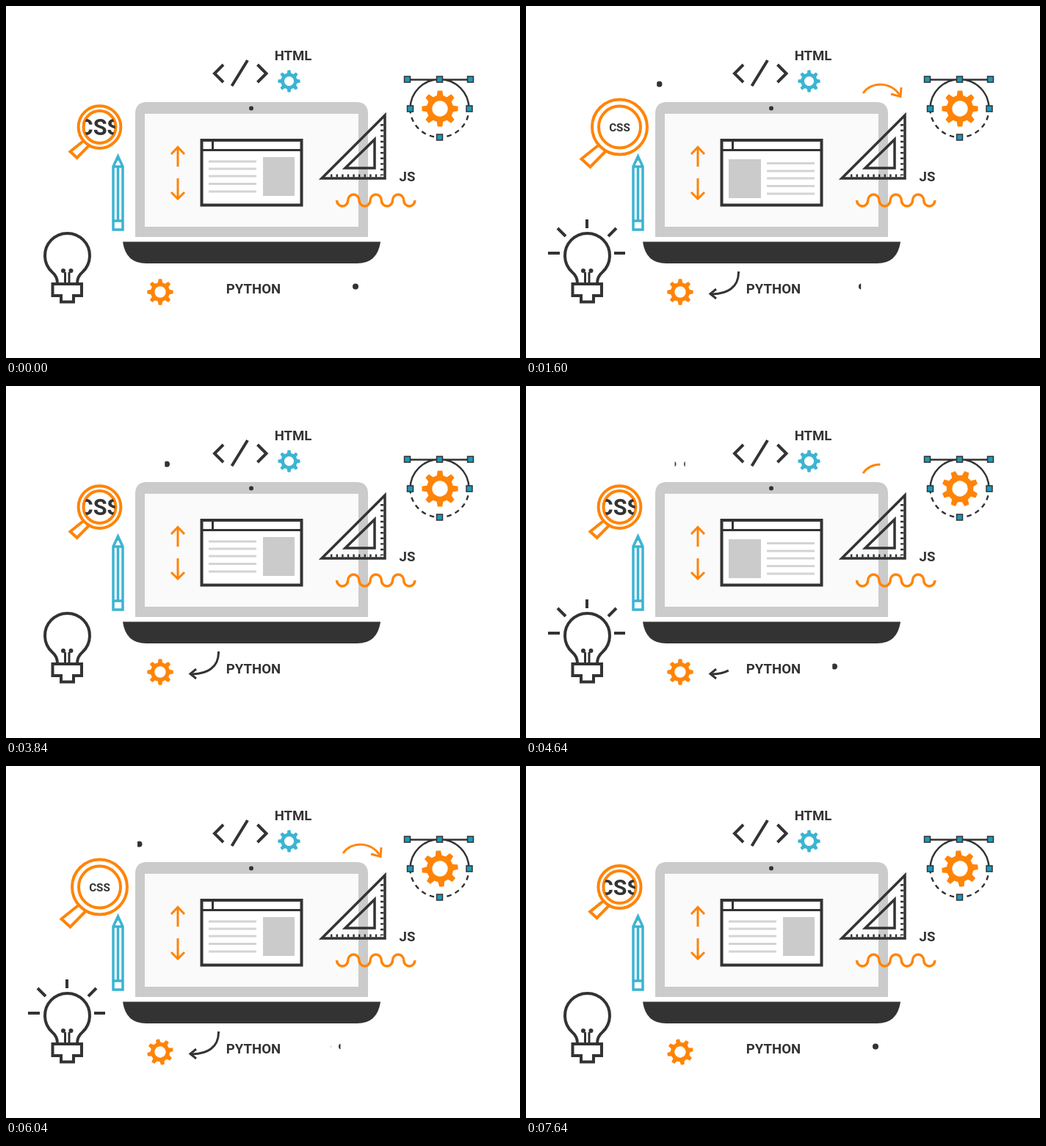
These frames come from a looping animation (700x480 px, 7680 ms). An HTML page:

```html
<!DOCTYPE html>
<html lang="en">
<head>
<meta charset="utf-8">
<title>Web development</title>
<style>
  html, body { margin: 0; width: 100%; height: 100%; overflow: hidden; background: #fff; }
  svg { display: block; width: 700px; height: 480px; --dark: #333; --orange: #ff8408; --cyan: #3cb4d2; }
  text { font: 700 18.6px Roboto, "Open Sans", sans-serif; fill: var(--dark); text-anchor: middle; }
  .line { fill: none; stroke: var(--dark); stroke-width: 4; }
  .orange { stroke: var(--orange); }
  .cyan { stroke: var(--cyan); }
  .thin { stroke-width: 3; }
  #lens * { vector-effect: non-scaling-stroke; }
</style>
</head>
<body>
<svg viewBox="0 0 700 480">
  <defs>
    <path id="gear" fill-rule="evenodd"/>
    <clipPath id="glass"><circle id="glassEdge" cx="127.500" cy="165"/></clipPath>
    <clipPath id="topWindow"><rect id="topRect" y="96" width="14" height="20"/></clipPath>
    <clipPath id="lowWindow"><rect id="lowRect" y="372" width="13" height="20"/></clipPath>
  </defs>

  <!-- laptop -->
  <path d="M176 315V147Q176 131 192 131H477Q493 131 493 147V315Z" fill="#cbcbcb"/>
  <path d="M189 147H480V301H189Z" fill="#fafafa"/>
  <circle cx="334" cy="139.5" r="3" fill="#2b3436"/>
  <path d="M159 321.5H510Q506 351 478 351H191Q163 351 159 321.5Z" fill="#333"/>

  <!-- browser window -->
  <path class="line" d="M266.500 183H402.500V271.500H266.500Z" style="fill:#fff"/>
  <path class="line thin" d="M267 196.500H402M281.500 183V196"/>
  <g id="pageRight">
    <path d="M350 206H393V259H350Z" fill="#cbcbcb"/>
    <path class="line thin" style="stroke:#d4d4d4" d="M276 212H341M276 222H341M276 232H341M276 242.500H341M276 253H341"/>
  </g>
  <g id="pageLeft">
    <path d="M276 209H320V262H276Z" fill="#cbcbcb"/>
    <path class="line thin" style="stroke:#d4d4d4" d="M328 214.500H393M328 225H393M328 235H393M328 245.500H393M328 256H393"/>
  </g>
  <path class="line orange thin" d="M234 219V193M225 202L234 192.500L243 202M234 235V262M225 254L234 263L243 254"/>

  <!-- code and words -->
  <path class="line" d="M296 80L284 92L296 104M329 74L307.500 109M342.500 80L354.500 92L342.500 104"/>
  <text x="391" y="73.500">HTML</text>
  <text x="546.500" y="239">JS</text>
  <text x="337" y="391.500">PYTHON</text>

  <!-- magnifier -->
  <g id="lens" class="line orange">
    <circle r="37.5"/><circle r="28.5"/>
    <path d="M-29 25L-52 43.500L-40 54.500L-19 33"/>
  </g>
  <g clip-path="url(#glass)"><text id="css">CSS</text></g>

  <!-- pencil -->
  <path class="line cyan" style="stroke-width:3.5" d="M146 219L152.500 205L159 219V305H146ZM146 219H159M152.500 219V293M146 293H159"/>
  <path d="M149 211L152.500 203L156 211Z" fill="#3cb4d2"/>

  <!-- bulb -->
  <path class="line" d="M70 378Q70 369 63 363A30.500 30.500 0 1 1 104 363Q97 369 97 378M63.500 379H103V395H92V403.500H75V395H63.500Z"/>
  <path class="line thin" d="M80.500 378V363M86 378V363"/>
  <circle cx="78" cy="361" r="3" fill="#333"/>
  <circle cx="88.500" cy="361" r="3" fill="#333"/>
  <path id="rays" class="line"/>

  <!-- set square -->
  <path class="line" d="M516 149V235H430ZM502 182V221H462Z" style="stroke-width:3.5"/>
  <path class="line" d="M512 161V231M442 231.500H511" stroke-dasharray="2.4 5.200"/>
  <path id="wave" class="line orange" style="stroke-width:3.5"/>

  <!-- curve tool -->
  <path class="line" style="stroke-width:2.4" d="M546 100.500H632M550.500 140A40 40 0 0 1 630.500 140"/>
  <path class="line" style="stroke-width:2.4" stroke-dasharray="6.5 5.5" d="M550.500 140A40 39 0 0 0 630.500 140"/>
  <g id="nodes" fill="#1c98b8" stroke="#333" stroke-width="1.5"></g>

  <!-- gears -->
  <use href="#gear" fill="#3cb4d2" transform="translate(385.5 102.5) scale(15.2)"/>
  <use href="#gear" id="lowGear" fill="#ff8408"/>
  <use href="#gear" id="bigGear" fill="#ff8408"/>

  <!-- arrows -->
  <g class="line orange thin">
    <path id="topArrow" pathLength="1" d="M459 119C470 103 497 102 510 123"/>
    <path id="topHead" d="M497 120L510 123.500L511 111"/>
  </g>
  <g class="line thin">
    <path id="lowArrow" pathLength="1" d="M289.500 362C290 384 274 393 251 393"/>
    <path id="lowHead" d="M259 386L251 392.500L259 399"/>
  </g>

  <!-- dotted trails -->
  <g id="topDots" clip-path="url(#topWindow)" fill="#333"></g>
  <g id="lowDots" clip-path="url(#lowWindow)" fill="#333"></g>
</svg>
<script>
const $ = id => document.getElementById(id);
const set = (id, attrs) => {
  for (const k in attrs) $(id).setAttribute(k, attrs[k]);
};
const ramp = (t, a, b) => Math.min(1, Math.max(0, (t - a) / (b - a)));
const ease = x => x * x * (3 - 2 * x);
const show = (id, on) => $(id).style.visibility = on ? 'visible' : 'hidden';

// Eight tapered teeth around a ring of unit size, one pointing straight up
function gearPath() {
  const points = [];
  for (let i = 0; i < 8; i++) {
    for (const [da, r] of [[-.24, .74], [-.13, 1], [.13, 1], [.24, .74]]) {
      const a = i * Math.PI / 4 + da;
      points.push(`${Math.cos(a) * r} ${Math.sin(a) * r}`);
    }
  }
  return `M${points.join('L')}ZM.43 0A.43 .43 0 1 0 -.43 0A.43 .43 0 1 0 .43 0Z`;
}

function build() {
  set('gear', { d: gearPath() });
  let wave = 'M450.5 265';
  for (let i = 0; i < 7; i++) wave += `a7.6 8 0 0 ${i % 2} 15.2 0`;
  set('wave', { d: wave });
  const nodes = [[546.5, 100], [590.5, 100], [632.5, 100], [550.5, 140], [631, 140], [590.5, 179]];
  $('nodes').innerHTML = nodes.map(([x, y]) =>
    `<rect x="${x - 4}" y="${y - 4}" width="8" height="8"/>`).join('');
  const dots = (id, xs, y) => $(id).innerHTML =
    xs.map(x => `<circle cx="${x}" cy="${y}" r="4"/>`).join('');
  dots('topDots', [181.5, 200.5, 219], 106.5);
  dots('lowDots', [420, 438.5, 457, 476], 382.5);
}

// Shows the part of an arrow from a to b; the head sits at the far end
function trim(name, a, b) {
  set(name + 'Arrow', { 'stroke-dasharray': `0 ${a} ${b - a} 2` });
  show(name + 'Arrow', b > a);
  show(name + 'Head', b === 1 && a < 1);
}

function drawRays(k) {
  const rays = [[83, 303, 0, -12], [46, 337, -16, 0], [120, 337, 15, 0],
                [54, 314, -11, -11], [112, 314, 11, -11]];
  set('rays', { d: rays.map(([x, y, dx, dy]) => `M${x} ${y}l${dx * k} ${dy * k}`).join('') });
  show('rays', k > 0);
}

function draw(now) {
  const loop = Math.floor(now % 7680 / 40) * 40;
  const t = loop % 3840;
  const swing = Math.min(loop, 7680 - loop);

  drawRays(ramp(t, 0, 400) - ramp(t, 2300, 2700));

  const zoom = ease(ramp(t, 960, 1440)) - ease(ramp(t, 3360, 3840));
  const size = .77 + .23 * zoom;
  set('lens', { transform: `translate(127.5 165) scale(${size})` });
  set('glassEdge', { r: 27.5 * size });
  set('css', { transform: `translate(127.5 165) scale(${1.65 - .83 * zoom}) translate(0 6.8)` });

  const left = t >= 240 && t < 2000;
  show('pageLeft', left);
  show('pageRight', !left);

  trim('top', ramp(t, 3000, 3400), ramp(t, 620, 1020));
  const u = loop % 2560;
  trim('low', ramp(u, 1850, 2270), ramp(u, 240, 640));

  const turn = loop * 360 / 2560;
  set('lowGear', { transform: `translate(210 390) rotate(${turn * 2}) scale(17.8)` });
  set('bigGear', { transform: `translate(591 140) rotate(${turn}) scale(24.8)` });

  // Each trail is seen through a narrow window that moves out and back
  set('topRect', { x: 151 + swing * .017 });
  set('lowRect', { x: 472 - swing * .018 });
}

build();
const start = performance.now();
function tick() {
  draw(performance.now() - start);
  requestAnimationFrame(tick);
}
tick();
</script>
</body>
</html>
```
